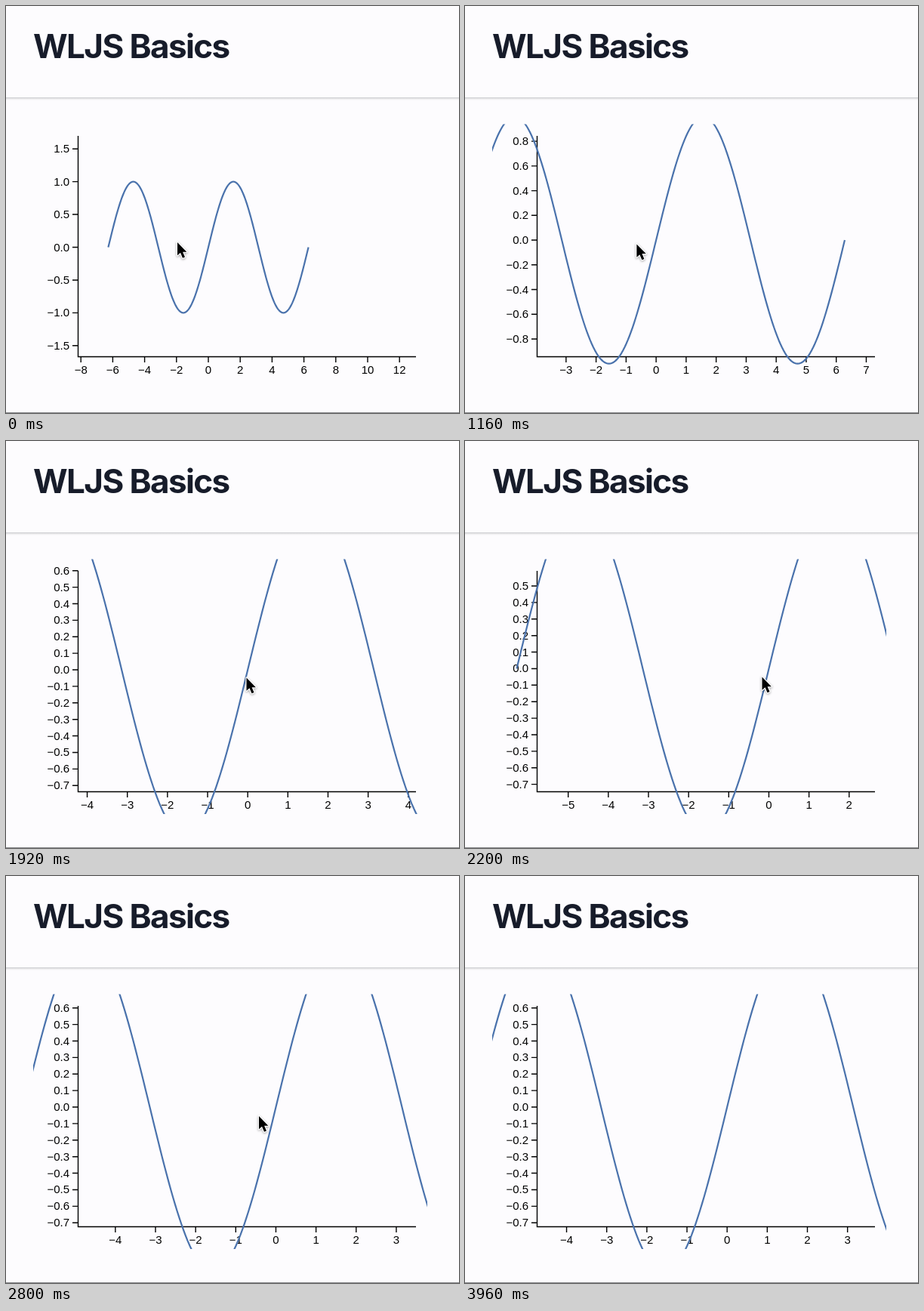
These frames come from a looping animation (600 px wide and 539 px high, 4000 ms). An HTML page:

```html
<!DOCTYPE html>
<html lang="en">
<head>
<meta charset="utf-8">
<title>WLJS Basics</title>
<style>
  html, body { margin: 0; width: 100%; height: 100%; overflow: hidden; background: #fdfcfe; }
  svg { display: block; width: 100vw; height: 100vh; }
  .title { font: 700 44px Inter, sans-serif; letter-spacing: -1.6px; fill: #171c2a; }
  .axes text { font: 15px "Liberation Sans", Arial, sans-serif; fill: #000; }
  .axes path { fill: none; stroke: #000; stroke-width: 1.4; }
  #yLabels { text-anchor: end; }
  #xLabels { text-anchor: middle; }
  #curve { fill: none; stroke: #4a72ac; stroke-width: 2.2; stroke-linejoin: round; }
  #cursor { filter: drop-shadow(0 1.5px 1.5px rgba(0, 0, 0, .35)); }
</style>
</head>
<body>
<svg viewBox="0 0 600 539">
  <defs>
    <linearGradient id="shade" x2="0" y2="1">
      <stop offset="0" stop-color="#000" stop-opacity=".07"/>
      <stop offset="1" stop-color="#000" stop-opacity="0"/>
    </linearGradient>
    <clipPath id="plot"><rect x="36" y="156.5" width="522" height="337.5"/></clipPath>
  </defs>
  <rect width="600" height="539" fill="#fdfcfe"/>
  <text class="title" x="36" y="69">WLJS Basics</text>
  <rect y="121" width="600" height="1.4" fill="#d2d2d5"/>
  <rect y="122.4" width="600" height="3" fill="url(#shade)"/>
  <rect y="538" width="600" height="1" fill="#8a8a8d"/>
  <g class="axes">
    <path d="M95.5 172V464.5H543"/>
    <path id="ticks"/>
    <g id="xLabels"></g>
    <g id="yLabels"></g>
  </g>
  <g clip-path="url(#plot)"><path id="curve"/></g>
  <path id="cursor" d="M0 0V17.3L4 13.8L7 20.8L10 19.5L7.1 12.7H12.4Z"
        fill="#000" stroke="#fff" stroke-width="2.4" stroke-linejoin="round" paint-order="stroke"/>
</svg>
<script>
const LOOP = 4000, STEP = 40;
const LEFT = 95.5, RIGHT = 543, TOP = 171.5, BOTTOM = 464.5;
const ZOOM = { start: 635, end: 1473, log: 0.924, x: 284.8, y: 330.2 };
const BASE = { kx: 21.1, ky: 86.85, dx: -16.8, dy: -10.7 };
const CURSOR_HIDE = 3400;

// Keys are [time, value]
const panX = [[1500, 0], [1920, 77.7], [2200, 160], [2340, 173], [2800, 115], [3000, 104.7]];
const panY = [[1500, 0], [1920, -0.2], [2200, -1.8], [2340, -1.8], [2800, 2.8]];
const mouseX = [[0, 227], [920, 227.5], [1480, 227.2], [1920, 318.5], [2200, 393.5],
                [2320, 402], [2800, 335], [2940, 331.7]];
const mouseY = [[0, 313], [920, 316], [1400, 314.5], [1920, 313.5], [2200, 312.5],
                [2320, 312.5], [2800, 318]];

const el = id => document.getElementById(id);
const clamp = v => Math.min(1, Math.max(0, v));
const smooth = p => p * p * (3 - 2 * p);

// Monotone cubic interpolation
function track(keys, t) {
  const last = keys.length - 1;
  if (t <= keys[0][0]) return keys[0][1];
  if (t >= keys[last][0]) return keys[last][1];
  const rate = i => (keys[i + 1][1] - keys[i][1]) / (keys[i + 1][0] - keys[i][0]);
  const slope = i => {
    if (i === 0 || i === last) return 0;
    const a = rate(i - 1), b = rate(i);
    return a * b <= 0 ? 0 : 2 * a * b / (a + b);
  };
  const i = keys.findIndex(k => k[0] > t) - 1;
  const [t0, v0] = keys[i], [t1, v1] = keys[i + 1];
  const h = t1 - t0, p = (t - t0) / h, q = 1 - p;
  return v0 + (v1 - v0) * smooth(p) + h * p * q * (q * slope(i) - p * slope(i + 1));
}

// Round step giving about ten ticks over a span
function tickStep(span) {
  const raw = span / 10, pow = 10 ** Math.floor(Math.log10(raw)), e = raw / pow;
  return pow * (e >= Math.sqrt(50) ? 10 : e >= Math.sqrt(10) ? 5 : e >= Math.SQRT2 ? 2 : 1);
}

function tickList(min, max) {
  const step = tickStep(max - min), digits = step < 0.99 ? 1 : 0, list = [];
  for (let i = Math.ceil(min / step); i * step <= max; i++) {
    const v = i * step;
    list.push({ v, label: (v < 0 ? "\u2212" : "") + Math.abs(v).toFixed(digits) });
  }
  return list;
}

const text = (x, y, s) => `<text x="${x.toFixed(2)}" y="${y.toFixed(2)}">${s}</text>`;

function view(t) {
  const s = Math.exp(ZOOM.log * smooth(clamp((t - ZOOM.start) / (ZOOM.end - ZOOM.start))));
  return {
    kx: BASE.kx * s,
    ky: BASE.ky * s,
    x0: ZOOM.x + BASE.dx * s + track(panX, t),
    y0: ZOOM.y + BASE.dy * s + track(panY, t)
  };
}

function draw(t) {
  const { kx, ky, x0, y0 } = view(t);
  const px = x => x0 + x * kx, py = y => y0 - y * ky;
  let marks = "", xs = "", ys = "";

  for (const { v, label } of tickList((LEFT - x0) / kx, (RIGHT - x0) / kx)) {
    marks += `M${px(v).toFixed(2)} ${BOTTOM}v7.5`;
    xs += text(px(v), 487.3, label);
  }
  for (const { v, label } of tickList((y0 - BOTTOM) / ky, (y0 - TOP) / ky)) {
    marks += `M${LEFT} ${py(v).toFixed(2)}h-7.5`;
    ys += text(84, py(v) + 5, label);
  }
  el("ticks").setAttribute("d", marks);
  el("xLabels").innerHTML = xs;
  el("yLabels").innerHTML = ys;

  const n = 240, pts = [];
  for (let i = 0; i <= n; i++) {
    const x = (i / n * 4 - 2) * Math.PI;
    pts.push(px(x).toFixed(2) + " " + py(Math.sin(x)).toFixed(2));
  }
  el("curve").setAttribute("d", "M" + pts.join("L"));

  const cursor = el("cursor");
  cursor.setAttribute("transform", `translate(${track(mouseX, t)} ${track(mouseY, t)})`);
  cursor.setAttribute("visibility", t < CURSOR_HIDE ? "visible" : "hidden");
}

let begin;
function tick(now) {
  begin ??= now;
  draw(Math.floor((now - begin) % LOOP / STEP) * STEP);
  requestAnimationFrame(tick);
}
draw(0);
requestAnimationFrame(tick);
</script>
</body>
</html>
```
